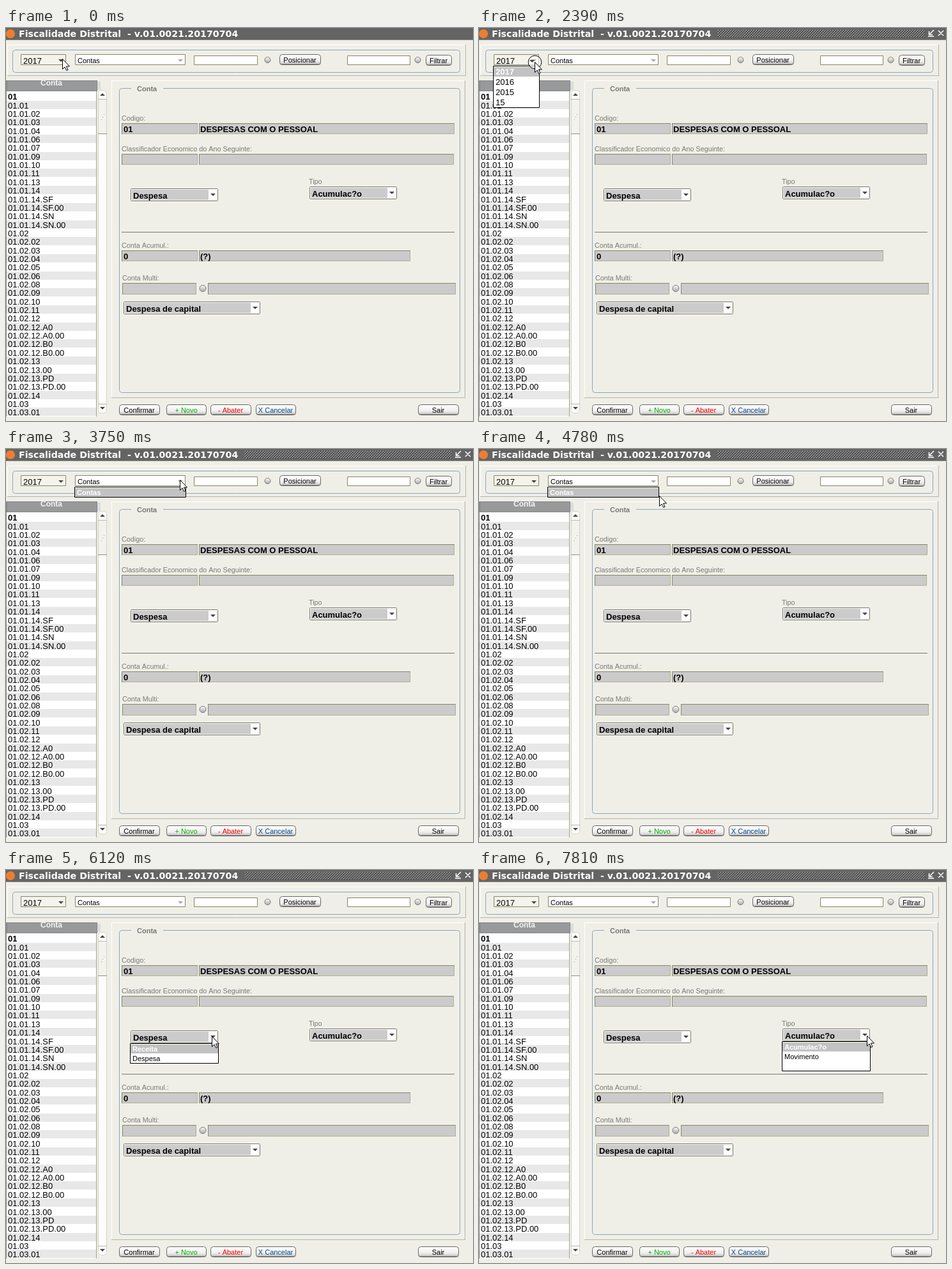
Write an HTML page with a canvas that moves like this. It is 731 px wide and 615 px high and loops after 8000 ms.

```html
<!DOCTYPE html>
<html lang="pt">
<head>
<meta charset="utf-8">
<title>Contas</title>
<style>
html, body { margin: 0; width: 100%; height: 100%; overflow: hidden; background: #f0efe7; }
canvas { display: block; }
</style>
</head>
<body>
<canvas id="stage" width="731" height="615"></canvas>
<script>
const ctx = document.getElementById('stage').getContext('2d');
const LOOP = 8000;
const SANS = '"Liberation Sans", Arial, sans-serif';
const BG = '#f0efe7', GRAY = '#cbcbcb', BLUE = '#8ba6bf', OLIVE = '#85856a', LABEL = '#777';

// time, tip x, tip y, click ring
const POINTER = [
  [0, 88, 48], [2390, 87, 53, true], [2730, 137, 56], [3070, 240, 42], [3410, 271, 48],
  [3750, 272, 48], [4780, 282, 73], [5110, 290, 161], [5450, 283, 233], [5790, 320, 261],
  [6120, 322, 260], [6460, 328, 263], [6800, 493, 283], [7140, 581, 258],
  [7470, 609, 259, true], [7810, 607, 259]
];

const POPUPS = [
  { from: 1370, to: 3750, box: [22, 59, 73, 66], size: 13, step: 16, items: ['2017', '2016', '2015', '15'] },
  { from: 3750, to: 6120, box: [107, 59, 175, 17], size: 11, step: 15, items: ['Contas'] },
  { from: 6120, to: 7810, box: [194, 271, 139, 32], size: 11, step: 15, items: ['Receita', 'Despesa'] },
  { from: 7810, to: LOOP, box: [474, 268, 139, 47], size: 11, step: 15, items: ['Acumulac?o', 'Movimento'] }
];

const ACCOUNTS = [
  '01',
  ...'01 01.02 01.03 01.04 01.06 01.07 01.09 01.10 01.11 01.13 01.14'.split(' '),
  ...'SF SF.00 SN SN.00'.split(' ').map(s => '01.14.' + s),
  ...'02 02.02 02.03 02.04 02.05 02.06 02.08 02.09 02.10 02.11 02.12'.split(' '),
  ...'A0 A0.00 B0 B0.00'.split(' ').map(s => '02.12.' + s),
  ...'02.13 02.13.00 02.13.PD 02.13.PD.00 02.14 03 03.01'.split(' ')
].map((code, i) => i ? '01.' + code : code);

function fill(x, y, w, h, color) {
  ctx.fillStyle = color;
  ctx.fillRect(x, y, w, h);
}

function frame(x, y, w, h, color, radius = 0) {
  ctx.strokeStyle = color;
  ctx.lineWidth = 1;
  ctx.beginPath();
  ctx.roundRect(x + .5, y + .5, w - 1, h - 1, radius);
  ctx.stroke();
}

function polygon(points, color, outline) {
  ctx.beginPath();
  points.forEach(([x, y]) => ctx.lineTo(x, y));
  ctx.closePath();
  ctx.fillStyle = color;
  ctx.fill();
  if (outline) {
    ctx.strokeStyle = outline;
    ctx.lineWidth = 1;
    ctx.stroke();
  }
}

function text(str, x, y, size = 11, color = '#000', bold = false, family = SANS) {
  ctx.font = `${bold ? 'bold ' : ''}${size}px ${family}`;
  ctx.fillStyle = color;
  ctx.fillText(str, x, y);
}

const label = (str, x, y) => text(str, x, y, 10.8, LABEL);
const value = (str, x, y) => text(str, x, y, 13, '#000', true);

function arrow(x, y, color = '#444', dir = 1) {
  polygon([[x - 4, y - 2 * dir], [x + 4, y - 2 * dir], [x, y + 2 * dir]], color);
}

function raised(x, y, w, h) {
  fill(x, y, w, 1, '#fff');
  fill(x, y, 1, h, '#fff');
  fill(x, y + h - 1, w, 1, '#b4b4ae');
  fill(x + w - 1, y, 1, h, '#b4b4ae');
}

function field(x, y, w, h, color = GRAY) {
  fill(x, y, w, h, color);
  frame(x, y, w, h, '#adad98');
  fill(x, y, w, 1, OLIVE);
  fill(x, y, 1, h, OLIVE);
}

function whiteField(x, y, w, h) {
  fill(x, y, w, h, '#fff');
  frame(x, y, w, h, OLIVE);
}

function grayCombo(str, x, y, w) {
  fill(x, y, w, 20, '#fff');
  frame(x, y, w, 20, '#777768', 1);
  fill(x + 2, y + 2, w - 17, 16, GRAY);
  arrow(x + w - 8, y + 10);
  value(str, x + 4, y + 16);
}

function bullet(x, y, r) {
  const shade = ctx.createLinearGradient(0, y - r, 0, y + r);
  shade.addColorStop(0, '#fafafa');
  shade.addColorStop(1, '#aaa');
  ctx.beginPath();
  ctx.arc(x, y, r, 0, 7);
  ctx.fillStyle = shade;
  ctx.fill();
  ctx.strokeStyle = '#777';
  ctx.lineWidth = 1;
  ctx.stroke();
}

function button(str, x, y, w, color = '#000') {
  const shade = ctx.createLinearGradient(0, y, 0, y + 17);
  shade.addColorStop(0, '#fff');
  shade.addColorStop(.6, '#f0f0ee');
  shade.addColorStop(1, '#b8b8b8');
  ctx.beginPath();
  ctx.roundRect(x, y, w, 17, 4);
  ctx.fillStyle = shade;
  ctx.fill();
  frame(x, y, w, 17, '#666', 4);
  fill(x + 3, y + 15, w - 6, 1, '#888');
  ctx.textAlign = 'center';
  text(str, x + w / 2 - .5, y + 12.5, 11, color);
  ctx.textAlign = 'left';
}

function drawTitle(active) {
  fill(0, 0, 731, 18, '#646464');
  fill(0, 18, 731, 1, '#84847f');
  ctx.beginPath();
  ctx.arc(7, 9, 7, 0, 7);
  ctx.fillStyle = '#ee7d31';
  ctx.fill();
  const family = '"DejaVu Sans", sans-serif';
  text('Fiscalidade Distrital', 20, 14, 14.2, '#fff', true, family);
  text('- v.01.0021.20170704', 190, 14, 14.2, '#fff', true, family);
  if (!active) return;
  for (let y = 3; y < 15; y += 2) {
    for (let x = 374 + (y % 4 === 1 ? 2 : 0); x < 698; x += 4) {
      fill(x, y, 1, 1, '#d8d8d8');
      fill(x + 1, y + 1, 1, 1, '#222');
    }
  }
  ctx.strokeStyle = '#fff';
  ctx.lineWidth = 1.5;
  ctx.stroke(new Path2D('M712 3L705 10M704.5 5V10.5H710M703 13H712M719 4L727 12M727 4L719 12'));
}

function drawToolbar() {
  raised(2, 26, 718, 49);
  frame(10, 34, 701, 36, BLUE, 4);
  fill(23, 41, 71, 17, '#f4f4ec');
  frame(23, 41, 71, 17, OLIVE);
  text('2017', 27, 56, 13);
  arrow(86, 51);
  whiteField(108, 41, 173, 17);
  text('Contas', 112, 55);
  arrow(273, 51, '#aaa');
  whiteField(294, 43, 100, 15);
  bullet(409.5, 50, 4.5);
  button('Posicionar', 428, 41, 65);
  whiteField(534, 43, 99, 15);
  bullet(644.5, 50, 4.5);
  button('Filtrar', 657, 42, 41);
}

function drawList() {
  fill(1, 82, 142, 17, '#999');
  frame(1, 82, 142, 17, '#7b8793');
  ctx.save();
  ctx.beginPath();
  ctx.rect(1, 82, 142, 17);
  ctx.clip();
  text('Conta', 54, 90, 12, '#f4f4f4', true);
  ctx.restore();

  fill(1, 99, 141, 509, '#fff');
  ACCOUNTS.forEach((code, i) => {
    const y = Math.round(100.3 + i * 13.35);
    if (i % 2) fill(1, y, 140, 13, '#e8e8e8');
    text(code, 3, y + 12, 13, '#000', !i);
  });
  fill(0, 82, 1, 526, '#8d8d80');
  fill(141, 99, 1, 509, '#a5a590');

  fill(143, 84, 5, 13, '#dcdcd8');
  ctx.beginPath();
  ctx.roundRect(144, 97, 14, 506, 4);
  ctx.fillStyle = '#fcfcfa';
  ctx.fill();
  frame(144, 97, 14, 506, '#d2d2ca', 4);
  fill(145, 111, 12, 54, '#f3f3ee');
  fill(144, 111, 14, 1, '#b8b8b0');
  fill(144, 165, 14, 1, '#909088');
  fill(144, 588, 14, 1, '#b8b8b0');
  arrow(151, 104, '#444', -1);
  arrow(151, 595);
  for (let i = 0; i < 3; i++) fill(149 + i * 2, 143 - i * 4, 1, 1, '#999');
}

function drawForm() {
  raised(165, 82, 554, 497);
  frame(177, 94, 534, 477, BLUE, 4);
  fill(196, 92, 50, 6, BG);
  text('Conta', 205, 99, 11, LABEL, true);

  label('Codigo:', 181, 145);
  field(181, 149, 119, 17);
  field(302, 149, 400, 17);
  value('01', 184, 163);
  value('DESPESAS COM O PESSOAL', 304, 163);

  label('Classificador Economico do Ano Seguinte:', 181, 193);
  field(181, 197, 119, 17);
  field(302, 197, 399, 17);

  grayCombo('Despesa', 195, 251, 137);
  label('Tipo', 474, 244);
  grayCombo('Acumulac?o', 475, 248, 137);
  fill(181, 319, 521, 1, '#777');

  label('Conta Acumul.:', 181, 344);
  field(181, 348, 119, 17);
  field(302, 348, 331, 17);
  value('0', 184, 362);
  value('(?)', 304, 362);

  label('Conta Multi:', 182, 395);
  field(182, 399, 116, 18);
  bullet(308, 407.5, 5);
  field(316, 399, 388, 18);
  grayCombo('Despesa de capital', 184, 428, 214);

  button('Confirmar', 177, 589, 64);
  button('+ Novo', 251, 589, 63, '#00b000');
  button('- Abater', 320, 589, 64, '#f00000');
  button('X Cancelar', 391, 589, 63, '#004a94');
  button('Sair', 645, 589, 64);
}

function drawPopup({ box: [x, y, w, h], items, size, step }) {
  fill(x, y, w, h, '#fff');
  frame(x, y, w, h, '#000');
  fill(x + 1, y + 2, w - 2, step - 1, '#c2c2c2');
  items.forEach((item, i) => {
    const baseline = y + (size > 11 ? 14 : 13) + i * step;
    text(item, x + 4, baseline, size, i ? '#000' : '#fff', !i);
  });
}

function drawPointer([, x, y, ring]) {
  if (ring) {
    ctx.beginPath();
    ctx.arc(x + .5, y + .5, 10.3, 0, 7);
    ctx.fillStyle = 'rgba(255,255,255,.6)';
    ctx.fill();
    ctx.strokeStyle = '#000';
    ctx.lineWidth = 1;
    ctx.stroke();
    arrow(x - 4, y - 1);
  }
  const shape = [[0, 0], [0, 16], [3.5, 12.5], [6.3, 18], [8.5, 17], [6, 11.5], [11, 11.5]];
  polygon(shape.map(([dx, dy]) => [x + dx + .5, y + dy + .5]), '#fff', '#000');
}

function render(now) {
  const t = now % LOOP;
  fill(0, 0, 731, 615, BG);
  drawTitle(t >= 1370);
  drawToolbar();
  drawList();
  drawForm();
  POPUPS.filter(p => t >= p.from && t < p.to).forEach(drawPopup);
  drawPointer(POINTER.findLast(p => t >= p[0]));
}

const start = performance.now();
function tick() {
  render(performance.now() - start);
  requestAnimationFrame(tick);
}
tick();
</script>
</body>
</html>
```
